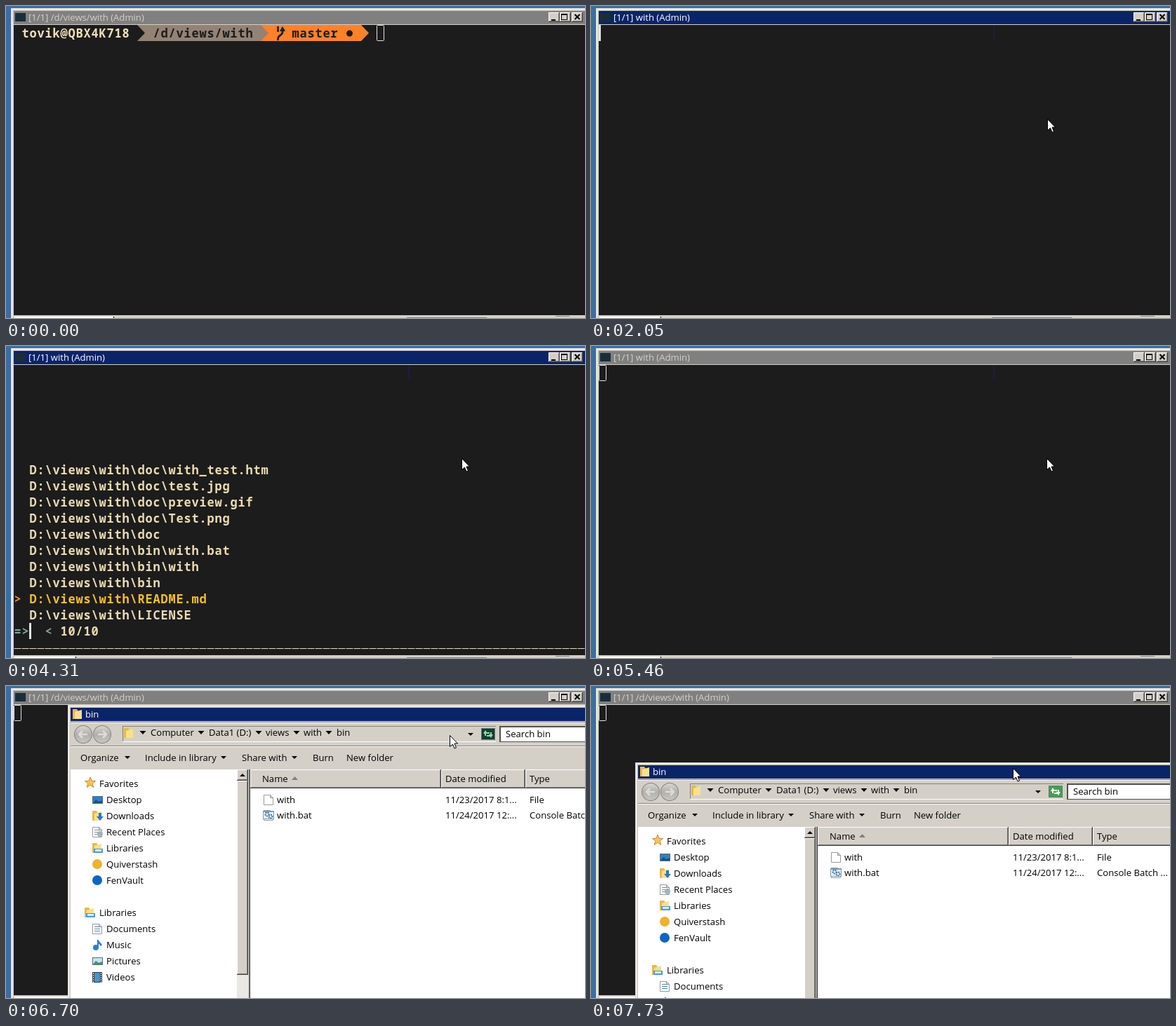
An HTML page with a canvas for the animation above (8 s loop, 825x445 px).

```html
<!DOCTYPE html>
<html lang="en">
<head>
<meta charset="utf-8">
<title>Terminal and file browser</title>
<style>
html, body { margin: 0; width: 100%; height: 100%; overflow: hidden; background: #3a6ea5 }
canvas { display: block }
</style>
</head>
<body>
<canvas id="stage" width="825" height="445"></canvas>
<script>
const g = document.getElementById('stage').getContext('2d');
const LOOP = 8000;
const FACE = '#d4d0c8', NAVY = '#0a246a', BLACK = '#1c1c1c', CREAM = '#ebdbb2', ORANGE = '#fe8228', GREY = '#928374';
const FILES = ['doc\\with_test.htm', 'doc\\test.jpg', 'doc\\preview.gif', 'doc\\Test.png', 'doc',
  'bin\\with.bat', 'bin\\with', 'bin', 'README.md', 'LICENSE'];

// Last value whose start time has passed: [time, value, time, value, ...]
function stepAt(t, steps) {
  let value = steps[1];
  for (let i = 0; i < steps.length; i += 2) if (t >= steps[i]) value = steps[i + 1];
  return value;
}

function box(x, y, w, h, color) {
  g.fillStyle = color;
  g.fillRect(x, y, w, h);
}

function frame(x, y, w, h, color) {
  g.strokeStyle = color;
  g.lineWidth = 1;
  g.strokeRect(x + .5, y + .5, w - 1, h - 1);
}

function poly(points, fill, stroke) {
  g.beginPath();
  for (let i = 0; i < points.length; i += 2) g.lineTo(points[i], points[i + 1]);
  g.closePath();
  if (fill) { g.fillStyle = fill; g.fill(); }
  if (stroke) { g.strokeStyle = stroke; g.lineWidth = 1; g.stroke(); }
}

function disc(x, y, r, fill) {
  g.beginPath();
  g.arc(x, y, r, 0, 7);
  g.fillStyle = fill;
  g.fill();
}

function bevel(x, y, w, h) {
  box(x, y, w, h, '#404040');
  box(x, y, w - 1, h - 1, '#fff');
  box(x + 1, y + 1, w - 2, h - 2, '#808080');
  box(x + 1, y + 1, w - 3, h - 3, FACE);
}

function label(text, x, y, color = '#000') {
  g.font = '13.1px "Open Sans", "Noto Sans", sans-serif';
  g.fillStyle = color;
  g.fillText(text, x, y);
}

const colX = col => 11 + col * 11;
const rowY = row => 27 + row * 23;

function type(text, col, row, color = CREAM) {
  g.font = '600 17px "Noto Sans Mono", monospace';
  g.fillStyle = color;
  [...text].forEach((c, i) => g.fillText(c, colX(col + i) + .4, rowY(row) + 18));
}

const caret = (col, row) => box(colX(col), rowY(row), 3, 23, '#e4e4e4');

function hollowCaret(col) {
  g.beginPath();
  g.roundRect(colX(col) + .5, 27.5, 10, 22, 1);
  g.strokeStyle = '#e4e4e4';
  g.lineWidth = 1;
  g.stroke();
}

const dropArrow = (x, y) => poly([x - 4.5, y, x + 4.5, y, x, y + 5], '#000');

function arrowHead(col, color) {
  const x = colX(col);
  poly([x, 27, x + 11, 38.5, x, 50], color);
}

function prompt() {
  type('tovik@QBX4K718', 1, 0, '#f2e0b8');
  box(187, 27, 176, 23, GREY);
  box(363, 27, 143, 23, ORANGE);
  arrowHead(16, BLACK);
  arrowHead(32, GREY);
  arrowHead(45, ORANGE);
  type('/d/views/with', 18, 0, BLACK);
  type('master', 36, 0, BLACK);
  disc(489.5, 39, 4.5, BLACK);
  g.strokeStyle = BLACK;
  g.lineWidth = 2.6;
  g.stroke(new Path2D('M387.5 29V37M394 33V37Q394 40 390.5 42T387.5 49'));
  poly([390, 36, 394, 29, 398, 36], BLACK);
}

function finder(t) {
  const selected = stepAt(t, [0, 9, 4310, 8, 4600, 7]);
  FILES.forEach((file, i) => {
    const on = i === selected;
    if (on) type('>', 0, 6 + i, ORANGE);
    type('D:\\views\\with\\' + file, 2, 6 + i, on ? '#fabd2f' : CREAM);
  });
  type('=>', 0, 16, '#83a598');
  type('<', 4, 16, '#83a598');
  type('10/10', 6, 16);
  for (let col = 0; col < 74; col++) box(colX(col) + .5, 431, 10, 1, CREAM);
  if (stepAt(t, [0, 1, 3390, 0, 3870, 1, 4400, 0, 5080, 1])) caret(2, 16);
}

function terminal(t) {
  const active = t >= 600 && t < 5460;
  const running = t >= 2050 && t < 6000;
  box(0, 0, 825, 445, '#3a6ea5');
  box(7, 3, 818, 442, FACE);
  box(8, 4, 817, 1, '#fff');
  box(8, 4, 1, 441, '#fff');
  box(11, 7, 814, 19, active ? NAVY : '#808080');
  box(13, 10, 15, 12, '#1a2d38');
  label(`[1/1] ${running ? 'with' : '/d/views/with'} (Admin)`, 32, 21, active ? '#fff' : FACE);
  [773, 789, 806].forEach(x => bevel(x, 9, 16, 14));
  box(777, 19, 6, 2, '#000');
  frame(791, 11, 9, 9, '#000');
  box(791, 11, 9, 2, '#000');
  g.strokeStyle = '#000';
  g.lineWidth = 2;
  g.stroke(new Path2D('M810.5 12L817.5 19M817.5 12L810.5 19'));

  box(11, 27, 814, 414, BLACK);
  box(10, 441, 815, 4, FACE);
  const tabEnd = running ? 100 : 154;
  box(12, 443, tabEnd - 13, 2, '#fff');
  box(tabEnd - 1, 443, 1, 2, '#000');
  box(571, 444, 114, 1, '#808080');
  box(783, 442, 20, 1, '#808080');

  if (t < 2050) {
    prompt();
    const typed = stepAt(t, [0, '', 1280, 'w', 1450, 'wi', 1850, 'with']);
    type(typed, 47, 0, '#f2e0b8');
    if (active) caret(47 + typed.length, 0);
    else hollowCaret(47);
    return;
  }
  if (t < 5700) box(573, 27, 2, 22, '#1b1b45');
  if (t < 2590) caret(0, 0);
  else if (t >= 2850 && t < 5460) finder(t);
  else if (t >= 5460) hollowCaret(0);
}

function folder(x, y) {
  poly([x, y, x + 6, y, x + 8, y + 3, x + 13, y + 3, x + 13, y + 14, x, y + 14], '#e8b84c');
  poly([x + 3, y + 4, x + 13, y + 1, x + 13, y + 14, x + 3, y + 14], '#fbe08c');
}

function library(x, y) {
  folder(x, y);
  box(x + 2, y + 8, 13, 6, '#4c9bd0');
  box(x + 4, y + 9, 9, 3, '#d5ecf7');
}

function page(x, y) {
  poly([x + .5, y + .5, x + 9.5, y + .5, x + 13.5, y + 4.5, x + 13.5, y + 14.5, x + .5, y + 14.5], '#fff', '#999');
  poly([x + 9.5, y + .5, x + 9.5, y + 4.5, x + 13.5, y + 4.5], '#ddd', '#999');
}

function screen(x, y, ground, sky) {
  box(x, y + 2, 15, 11, '#5b6b78');
  box(x + 1, y + 3, 13, 9, sky);
  poly([x + 1, y + 12, x + 5, y + 7, x + 9, y + 10, x + 14, y + 8, x + 14, y + 12], ground);
}

function lines(x, y, color) {
  page(x, y);
  for (let i = 4; i < 13; i += 3) box(x + 3, y + i, 8, 1, color);
}

function star(x, y) {
  const points = [];
  for (let i = 0; i < 10; i++) {
    const r = i % 2 ? 3.4 : 8, a = i * Math.PI / 5;
    points.push(x + r * Math.sin(a), y - r * Math.cos(a));
  }
  poly(points, '#f8c45c', '#c98a2b');
}

const PLACES = [
  ['Desktop', (x, y) => screen(x, y, '#1c4f86', '#2a83c4')],
  ['Downloads', (x, y) => {
    folder(x, y);
    poly([x + 6, y + 8, x + 16, y + 8, x + 11, y + 14], '#2878c8');
    box(x + 9, y + 3, 4, 5, '#2878c8');
  }],
  ['Recent Places', (x, y) => { lines(x, y, '#7a8c96'); disc(x + 11, y + 10, 4, '#9fb4bd'); }],
  ['Libraries', library],
  ['Quiverstash', (x, y) => disc(x + 7, y + 7, 7, '#f0b22c')],
  ['FenVault', (x, y) => disc(x + 7, y + 7, 7, '#0a66c2')],
];
const LIBRARIES = [
  ['Documents', (x, y) => lines(x, y, '#4a84b4')],
  ['Music', (x, y) => {
    disc(x + 5, y + 11, 4, '#2a7fd0');
    box(x + 7, y, 2, 11, '#2a7fd0');
    poly([x + 8, y, x + 14, y + 7, x + 12, y + 9, x + 8, y + 4], '#2a7fd0');
  }],
  ['Pictures', (x, y) => screen(x, y, '#4c8f6a', '#c4e3f2')],
  ['Videos', (x, y) => {
    box(x, y, 14, 15, '#30383e');
    box(x + 3, y + 1, 8, 13, '#4a94cc');
    for (let i = 1; i < 15; i += 3) { box(x + 1, y + i, 1, 2, '#fff'); box(x + 12, y + i, 1, 2, '#fff'); }
  }],
];

function sideItems(items, y) {
  items.forEach(([name, icon], i) => {
    icon(123, y + i * 23 - 7);
    label(name, 143, y + i * 23 + 5);
  });
}

function navButton(x, dir) {
  disc(x, 69, 13, '#85837f');
  const shade = g.createLinearGradient(0, 57, 0, 81);
  shade.addColorStop(0, '#d8d6d2');
  shade.addColorStop(.5, '#b2b0ac');
  shade.addColorStop(1, '#c8c6c2');
  disc(x, 69, 12, shade);
  g.strokeStyle = '#dedcd8';
  g.lineWidth = 2.5;
  g.stroke(new Path2D(`M${x - 6} 69H${x + 6}M${x + dir} 64L${x + dir * 6} 69L${x + dir} 74`));
}

function browserBody() {
  box(92, 118, 253, 340, '#fff');
  star(120, 137);
  label('Favorites', 133, 143);
  sideItems(PLACES, 161);
  library(112, 315);
  label('Libraries', 133, 327);
  sideItems(LIBRARIES, 345);

  box(329, 118, 16, 340, '#eae8e4');
  bevel(329, 118, 16, 16);
  poly([333, 128, 341, 128, 337, 124], '#000');
  bevel(329, 134, 16, 277);
  box(345, 118, 3, 340, FACE);
  box(346, 118, 1, 340, '#808080');
  box(347, 118, 1, 340, '#404040');

  box(348, 118, 520, 340, '#fff');
  bevel(348, 118, 272, 27);
  bevel(620, 118, 120, 27);
  bevel(740, 118, 140, 27);
  label('Name', 365, 136);
  poly([407, 133, 416, 133, 411.5, 128], '#808080');
  label('Date modified', 626, 136);
  label('Type', 746, 136);

  page(367, 154);
  page(367, 176);
  box(366, 177, 16, 12, '#7d9cb5');
  box(367, 179, 14, 9, '#e8f2f8');
  g.strokeStyle = '#3c78a8';
  g.lineWidth = 2;
  g.setLineDash([2, 1]);
  g.beginPath();
  g.arc(372, 182, 2.5, 0, 7);
  g.moveTo(380, 185);
  g.arc(377, 185, 2.5, 0, 7);
  g.stroke();
  g.setLineDash([]);
  [['with', '11/23/2017 8:1...', 'File'], ['with.bat', '11/24/2017 12:...', 'Console Batch ...']].forEach((row, i) =>
    [386, 626, 746].forEach((x, j) => label(row[j], x, 166 + i * 22)));
}

function browser(t) {
  const loaded = t >= 6000, moved = t >= 7730;
  g.save();
  if (moved) g.translate(-25, 82);
  box(88, 27, 800, 440, FACE);
  box(89, 28, 800, 1, '#fff');
  box(89, 28, 1, 440, '#fff');
  box(92, 31, 800, 19, NAVY);
  folder(95, 33);
  label('bin', 113, 45, '#fff');
  [51, 85].forEach(y => { box(92, y, 800, 1, '#808080'); box(92, y + 1, 800, 1, '#fff'); });
  navButton(110, -1);
  navButton(137, 1);

  box(166, 57, 532, 1, '#808080');
  box(166, 57, 1, 23, '#808080');
  box(166, 79, 532, 1, '#fff');
  folder(168, 60);
  [195, 278, 360, 414, 460].forEach(x => dropArrow(x, 64));
  [['Computer', 206], ['Data1 (D:)', 289], ['views', 370], ['with', 424], ['bin', 471]].forEach(([s, x]) => label(s, x, 71));
  poly([658, 67, 666, 67, 662, 71], '#000');
  box(677, 60, 20, 17, moved ? '#3fa34d' : '#173c35');
  frame(677, 60, 20, 17, '#667a70');
  g.strokeStyle = moved ? '#fff' : '#8fe0a0';
  g.lineWidth = 2;
  g.stroke(new Path2D('M683 71V67H689M691 66V71H685'));
  poly([680, 68, 683, 63, 686, 68], g.strokeStyle);
  poly([688, 69, 694, 69, 691, 74], g.strokeStyle);
  box(703, 57, 200, 23, '#505050');
  box(705, 59, 200, 20, '#fff');
  label('Search bin', 712, 73);

  if (loaded) {
    [['Organize', 106, 173], ['Include in library', 198, 310], ['Share with', 336, 411], ['Burn', 437], ['New folder', 485]]
      .forEach(([s, x, arrow]) => {
        label(s, x, 107);
        if (arrow) poly([arrow - 4, 100, arrow + 4, 100, arrow, 104], '#000');
      });
    g.translate(0, 1);
  }
  browserBody();
  g.restore();
}

const checker = (() => {
  const tile = document.createElement('canvas');
  tile.width = tile.height = 2;
  const c = tile.getContext('2d');
  c.fillStyle = '#fff';
  c.fillRect(0, 0, 1, 1);
  c.fillRect(1, 1, 1, 1);
  return g.createPattern(tile, 'repeat');
})();

// Drag progress moves in discrete 120 ms steps
const dragAt = t => Math.min(1, Math.max(0, (Math.floor((t - 6620) / 120) - 2) / 6));

function dragOutline(t) {
  const p = dragAt(t);
  if (p <= 0 || t >= 7730) return;
  const x = Math.round(89 - 25 * p), y = Math.round(27 + 82 * p);
  g.globalCompositeOperation = 'difference';
  box(x, y, 825, 4, checker);
  box(x, y + 4, 4, 445, checker);
  g.globalCompositeOperation = 'source-over';
}

function pointerAt(t) {
  if (t < 740) {
    const p = Math.floor((t - 70) / 134) / 5, ease = 1 - (1 - p) ** 2;
    return [810 - 160 * ease, 343 - 182 * ease];
  }
  if (t < 6740) return stepAt(t, [0, [650, 161], 3230, [649, 160], 6350, [642, 118], 6620, [632, 70]]);
  const p = dragAt(t);
  return [626 - 25 * p, 35 + 82 * p];
}

function pointer(t) {
  if (t < 70) return;
  const [x, y] = pointerAt(t).map(Math.round);
  g.save();
  g.translate(x + .5, y + .5);
  poly([0, 0, 0, 16, 4, 12.5, 6.5, 18.5, 9, 17.5, 6.5, 11.5, 11, 11.5], '#fff', '#000');
  g.restore();
}

function draw() {
  const t = performance.now() % LOOP;
  terminal(t);
  if (t >= 5700) browser(t);
  dragOutline(t);
  pointer(t);
  requestAnimationFrame(draw);
}
draw();
</script>
</body>
</html>
```
